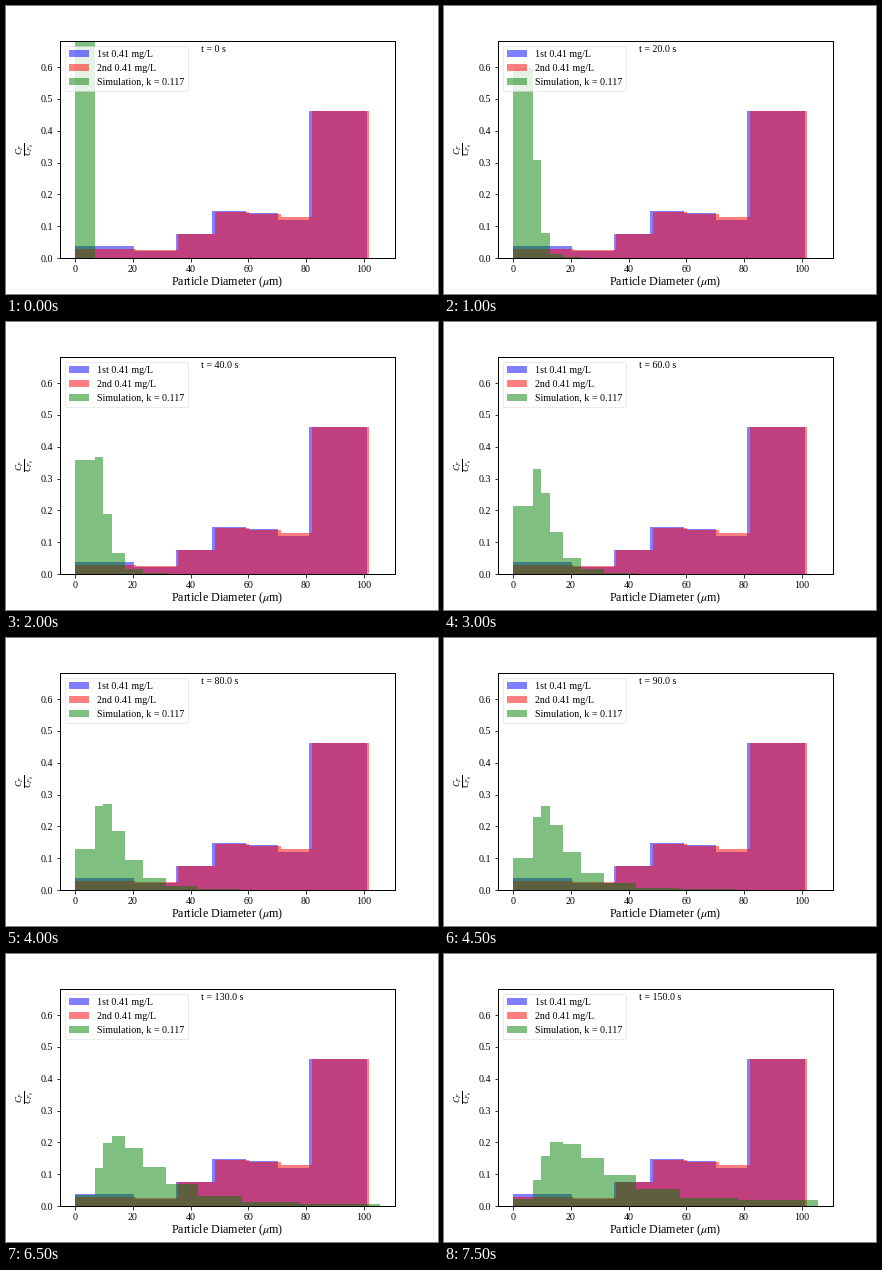
A matplotlib script that plays this animation: 432x288 px, repeating every 8000 ms.

```python
import math

import matplotlib.pyplot as plt
import numpy as np
from matplotlib.animation import FuncAnimation

plt.rcParams.update({
    "font.family": "Liberation Serif",
    "mathtext.fontset": "stix",
    "font.size": 10,
    "axes.linewidth": 1.0,
})

FRAMES = 16
STEP = 10.0              # simulated seconds per frame
RATE = 0.02569           # growth rate out of each size class, 1/s
CLASSES = 10
RATIO = 2 ** (1 / 2.3)   # mass doubles per class, fractal dimension 2.3
D_MAX = 105.5


def size_fractions(t):
    """Poisson chain of size classes; the last class collects the tail."""
    lam = RATE * t
    p = [math.exp(-lam) * lam**n / math.factorial(n) for n in range(CLASSES - 1)]
    return p + [max(0.0, 1 - sum(p))]


def measured_edges(first, power):
    """Bin edges on a power law; the last bin is twice as wide."""
    n = np.array([0, 1, 2, 3, 4, 5, 6, 8])
    return first * n**power


def draw_hist(ax, edges, heights, color, label):
    return ax.bar(edges[:-1], heights, np.diff(edges), align="edge",
                  color=color, alpha=0.5, label=label)


fig = plt.figure(figsize=(6, 4), dpi=72, facecolor="white")
fig.subplots_adjust(left=0.125, right=0.9, bottom=0.125, top=0.88)
ax = fig.add_subplot()

draw_hist(ax, measured_edges(20.46, 0.768),
          [0.038, 0.022, 0.075, 0.148, 0.141, 0.1205, 0.462],
          "blue", "1st 0.41 mg/L")
draw_hist(ax, measured_edges(20.91, 0.762),
          [0.027, 0.025, 0.075, 0.145, 0.138, 0.129, 0.462],
          "red", "2nd 0.41 mg/L")

sim_edges = np.append(0, D_MAX / RATIO ** np.arange(CLASSES - 1, -1, -1))
sim = draw_hist(ax, sim_edges, size_fractions(0), "green",
                "Simulation, k = 0.117")

ax.set_xlim(-0.05 * D_MAX, 1.05 * D_MAX)
ax.set_ylim(0, 0.6835)
ax.set_xticks(range(0, 101, 20))
ax.set_yticks(np.arange(7) / 10)
ax.set_xlabel(r"Particle Diameter ($\mu$m)", fontsize=12, labelpad=1)
ax.set_ylabel(r"$\frac{C_P}{C_{P_0}}$", fontsize=12, labelpad=3)
ax.legend(loc="upper left").get_frame().set_linewidth(0.5)
clock = ax.text(0.42, 0.948, "", transform=ax.transAxes)


def update(i):
    t = i * STEP
    for bar, h in zip(sim, size_fractions(t)):
        bar.set_height(h)
    clock.set_text(f"t = {t if i else 0} s")
    return [*sim, clock]


anim = FuncAnimation(fig, update, frames=FRAMES, interval=500,
                     repeat=True, repeat_delay=0, blit=False)
plt.show()
```
